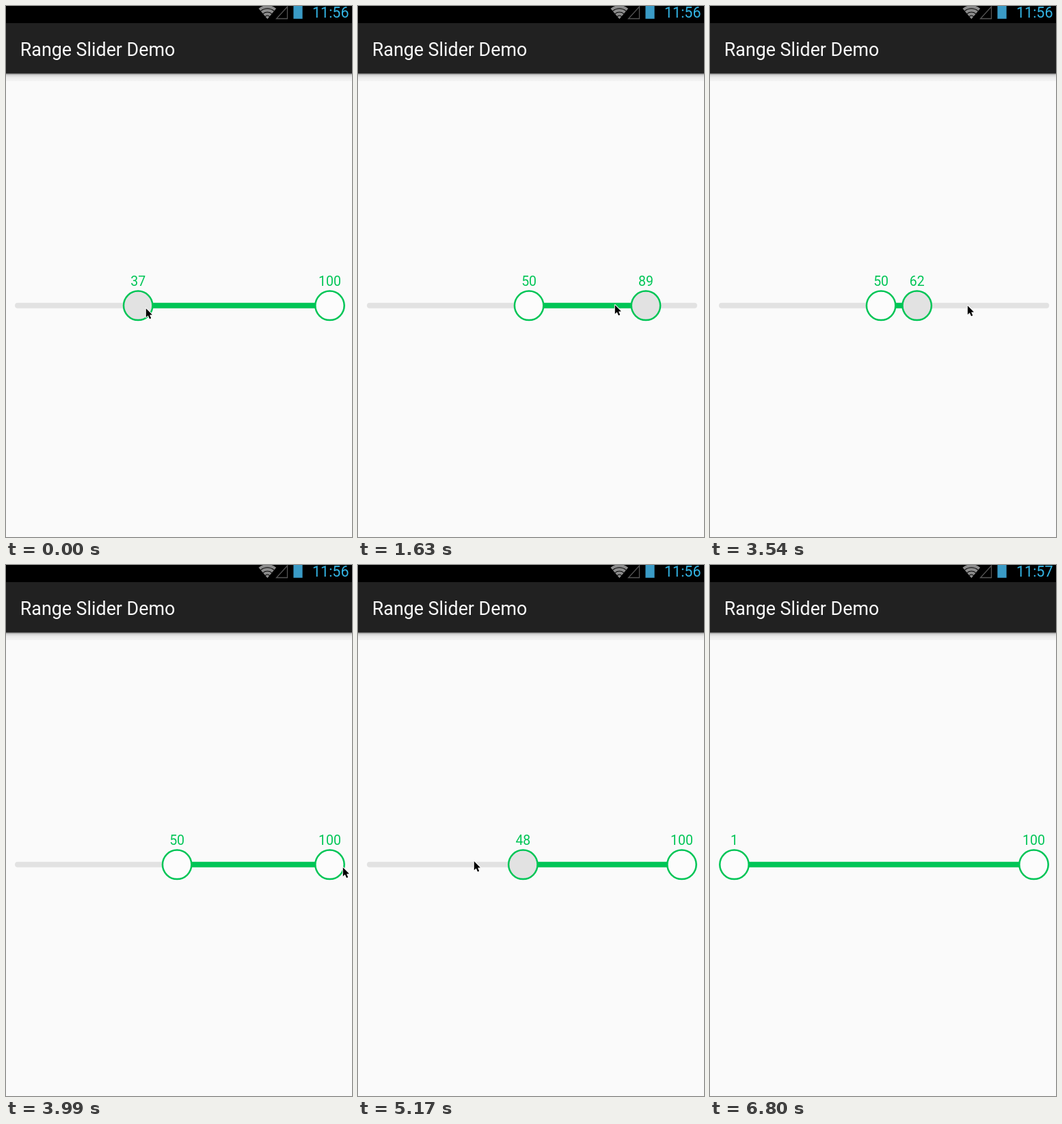
Recreate the animation shown at these times as an HTML page with a canvas. Size 506 by 776 pixels, loop 7100 ms.

```html
<!DOCTYPE html>
<html lang="en">
<head>
<meta charset="utf-8">
<title>Range Slider Demo</title>
<style>
  html, body { margin: 0; width: 100%; height: 100%; overflow: hidden; background: #fafafa; }
  canvas { display: block; width: 506px; height: 776px; }
</style>
</head>
<body>
<canvas id="stage"></canvas>
<script>
const W = 506, H = 776, LOOP = 7100, TICKS = 48;
const GREEN = '#00c556', GREY = '#e2e2e2', PAPER = '#fafafa';
const TRACK_Y = 437.8, MIN_X = 35.5, MAX_X = 473.5, STEPS = 100;

const canvas = document.getElementById('stage');
const dpr = window.devicePixelRatio || 1;
canvas.width = W * dpr;
canvas.height = H * dpr;
const ctx = canvas.getContext('2d');
ctx.scale(dpr, dpr);

// Pointer path as [tick, x, y], straight between the points.
const path = [
  [-1, 195, 441], [0, 204, 441], [1, 252, 442], [3, 252, 442], [5, 468, 444],
  [7, 473, 442], [9, 473, 442], [14, 228, 427], [16, 228, 427], [18, 223, 428],
  [22, 235, 435], [24, 376, 437], [26, 490, 441], [28, 494, 440], [32, 242, 429],
  [34, 242, 429], [38, -50, 440], [40, 10, 441], [41, 437, 638], [42, 437, 638],
  [45, 437, 800]
];

const drags = [
  { thumb: 'low', from: 0, to: 4 },
  { thumb: 'high', from: 9, to: 16 },
  { thumb: 'high', from: 20, to: 27 },
  { thumb: 'low', from: 34, to: 38 }
];

const clamp = (v, min, max) => Math.max(min, Math.min(max, v));
const toX = step => MIN_X + step * (MAX_X - MIN_X) / STEPS;
const toStep = x => Math.floor((x - MIN_X) * STEPS / (MAX_X - MIN_X));

function pointer(tick) {
  const i = path.findIndex(p => p[0] > tick);
  if (i < 0) return path[path.length - 1].slice(1);
  const [t0, x0, y0] = path[i - 1], [t1, x1, y1] = path[i];
  const k = (tick - t0) / (t1 - t0);
  return [x0 + (x1 - x0) * k, y0 + (y1 - y0) * k];
}

// A held thumb follows the pointer one tick behind and cannot pass the other.
function sliderAt(tick) {
  const s = { low: 0, high: STEPS, held: null };
  for (const { thumb, from, to } of drags) {
    if (tick < from) break;
    const step = toStep(pointer(Math.min(tick, to) - 1)[0]);
    s[thumb] = thumb === 'low' ? clamp(step, 0, s.high) : clamp(step, s.low, STEPS);
    if (tick < to) s.held = thumb;
  }
  return s;
}

function rect(x, y, w, h, fill) {
  ctx.fillStyle = fill;
  ctx.fillRect(x, y, w, h);
}

function text(str, x, y, size, fill, align = 'left') {
  ctx.font = `${size}px Roboto, sans-serif`;
  ctx.textAlign = align;
  ctx.fillStyle = fill;
  ctx.fillText(str, x, y);
}

function line(x1, x2, color, cap) {
  ctx.beginPath();
  ctx.moveTo(x1, TRACK_Y);
  ctx.lineTo(x2, TRACK_Y);
  ctx.lineWidth = 8;
  ctx.lineCap = cap;
  ctx.strokeStyle = color;
  ctx.stroke();
}

function polygon(points) {
  ctx.beginPath();
  points.forEach(([x, y]) => ctx.lineTo(x, y));
  ctx.closePath();
}

function drawWifi() {
  const up = -Math.PI / 2, half = 0.7;
  ctx.lineCap = 'butt';
  ctx.lineWidth = 4.3;
  ctx.strokeStyle = '#8c8c8c';
  for (let i = 0; i < 4; i++) {
    ctx.beginPath();
    ctx.arc(382.3, 19, 2.2 + i * 5.2, up - half, up + half);
    ctx.stroke();
  }
}

function drawChrome(tick) {
  rect(0, 0, W, H, PAPER);
  const shade = ctx.createLinearGradient(0, 99, 0, 110);
  shade.addColorStop(0, 'rgba(0,0,0,.42)');
  shade.addColorStop(0.2, 'rgba(0,0,0,.14)');
  shade.addColorStop(0.5, 'rgba(0,0,0,.06)');
  shade.addColorStop(1, 'rgba(0,0,0,.02)');
  rect(0, 98, W, 12, shade);
  rect(0, 0, W, 25, '#000');
  rect(0, 25, W, 73.6, '#212121');
  text('Range Slider Demo', 20.8, 73, 26.8, '#fafafa');

  drawWifi();
  polygon([[395.5, 18.5], [411.5, 18.5], [411.5, 1]]);
  ctx.lineWidth = 1.3;
  ctx.strokeStyle = '#555';
  ctx.stroke();
  rect(420.4, 0, 13.2, 18.7, '#3a9bc6');
  text(tick < 46 ? '11:56' : '11:57', 448, 17, 21.5, '#33b5e5');
}

function drawThumb(step, held) {
  const x = toX(step);
  ctx.beginPath();
  ctx.arc(x, TRACK_Y, 21.2, 0, Math.PI * 2);
  ctx.fillStyle = held ? GREY : '#fcfcfc';
  ctx.fill();
  ctx.lineWidth = 2.5;
  ctx.strokeStyle = GREEN;
  ctx.stroke();
  text(Math.min(step + 1, 100), x, 409, 19.5, GREEN, 'center');
}

function drawSlider(tick) {
  const { low, high, held } = sliderAt(tick);
  line(17, 492, GREY, 'round');
  line(toX(low), toX(high), GREEN, 'butt');
  // Coinciding thumbs share one label.
  if (low !== high) drawThumb(low, held === 'low');
  drawThumb(high, held === 'high');
}

function drawCursor(tick) {
  const [x, y] = pointer(tick);
  ctx.save();
  ctx.translate(Math.round(x) + 0.8, Math.round(y) + 0.9);
  ctx.scale(0.93, 0.93);
  polygon([[0, 0], [0, 14], [3.2, 11], [5.6, 16.6], [8, 15.5], [5.7, 10.2], [9.8, 10]]);
  ctx.lineJoin = 'round';
  ctx.lineWidth = 2;
  ctx.strokeStyle = '#fff';
  ctx.stroke();
  ctx.fillStyle = '#000';
  ctx.fill();
  ctx.restore();
}

function render(now) {
  const time = now % LOOP;
  // A small lead absorbs the rounding of the frame delays.
  const tick = Math.min(TICKS - 1, Math.floor((time + 11) * TICKS / LOOP));
  drawChrome(tick);
  drawSlider(tick);
  drawCursor(tick);
}

const start = performance.now();
function loop() {
  render(performance.now() - start);
  requestAnimationFrame(loop);
}
loop();
</script>
</body>
</html>
```
